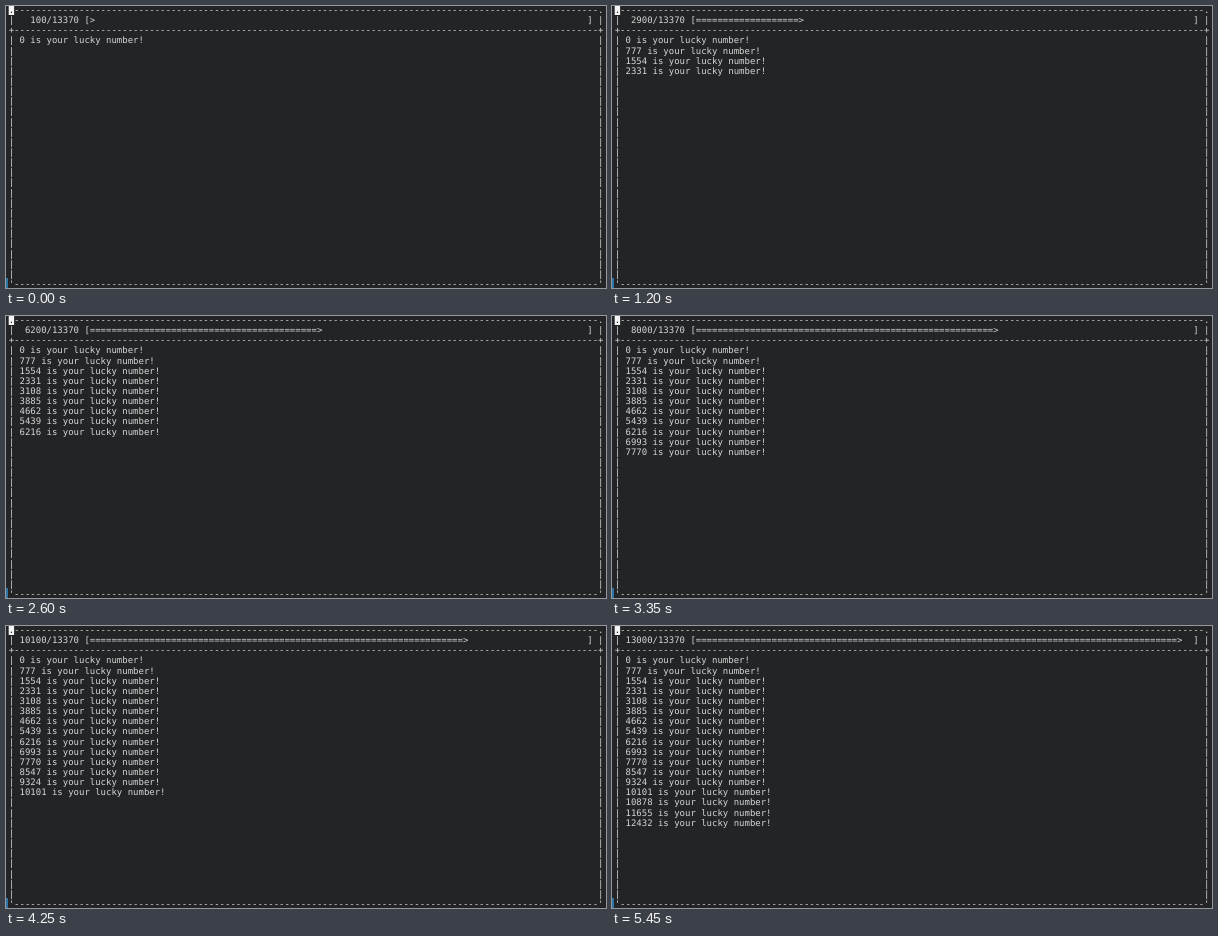
An HTML page with a canvas that plays this animation: 600 by 282 pixels, repeating every 5.5 s.

```html
<!DOCTYPE html>
<html lang="en">
<head>
<meta charset="utf-8">
<title>Lucky numbers</title>
<style>
  html, body { margin: 0; width: 100%; height: 100%; overflow: hidden; background: #232426; }
  canvas { display: block; width: 600px; height: 282px; }
</style>
</head>
<body>
<canvas id="term" width="600" height="282"></canvas>
<script>
const LOOP = 5500, TICK = 50, FIRST_HOLD = 100;
const COLS = 110, ROWS = 28, CELL_W = 5.407, CELL_H = 10.15;
const LEFT = 2.7, BASELINE = 6.9;
const TOTAL = 13370, LUCKY = 777, START = 100, RATE = 2.367;
const BAR = 92;
const BG = '#232426', FG = '#d6d6d6';

const ctx = document.getElementById('term').getContext('2d');

function put(text, col, row) {
  for (let i = 0; i < text.length; i++) {
    if (text[i] !== ' ') {
      ctx.fillText(text[i], LEFT + (col + i) * CELL_W, BASELINE + row * CELL_H);
    }
  }
}

const rule = (corner) => corner + '-'.repeat(COLS - 2) + corner;

function progress(count) {
  const done = Math.floor(count / TOTAL * BAR);
  const bar = ('='.repeat(done) + '>').padEnd(BAR);
  return `${String(count).padStart(5)}/${TOTAL} [${bar}]`;
}

function draw(time) {
  const tick = Math.floor(time / TICK) * TICK;
  const t = tick < FIRST_HOLD ? 0 : tick;
  const value = START + RATE * t;

  ctx.fillStyle = BG;
  ctx.fillRect(0, 0, 600, 282);
  ctx.fillStyle = '#2c75a8';
  ctx.fillRect(0, 272, 2, 10);

  ctx.font = '8.98px "DejaVu Sans Mono", monospace';
  ctx.textRendering = 'geometricPrecision';
  ctx.fillStyle = FG;
  put(rule('.'), 0, 0);
  put(rule('+'), 0, 2);
  put(rule("'"), 0, ROWS - 1);
  for (let row = 1; row < ROWS - 1; row++) {
    if (row === 2) continue;
    put('|', 0, row);
    put('|', COLS - 1, row);
  }

  put(progress(Math.floor(value / 100) * 100), 2, 1);
  for (let n = 0, row = 3; n <= value; n += LUCKY, row++) {
    put(`${n} is your lucky number!`, 2, row);
  }

  // Block cursor on the top-left corner
  ctx.fillStyle = '#f4f4f4';
  ctx.fillRect(LEFT, 0, CELL_W, 9);
  ctx.fillStyle = BG;
  put('.', 0, 0);
}

const begin = performance.now();
function loop() {
  draw((performance.now() - begin) % LOOP);
  requestAnimationFrame(loop);
}
loop();
</script>
</body>
</html>
```
